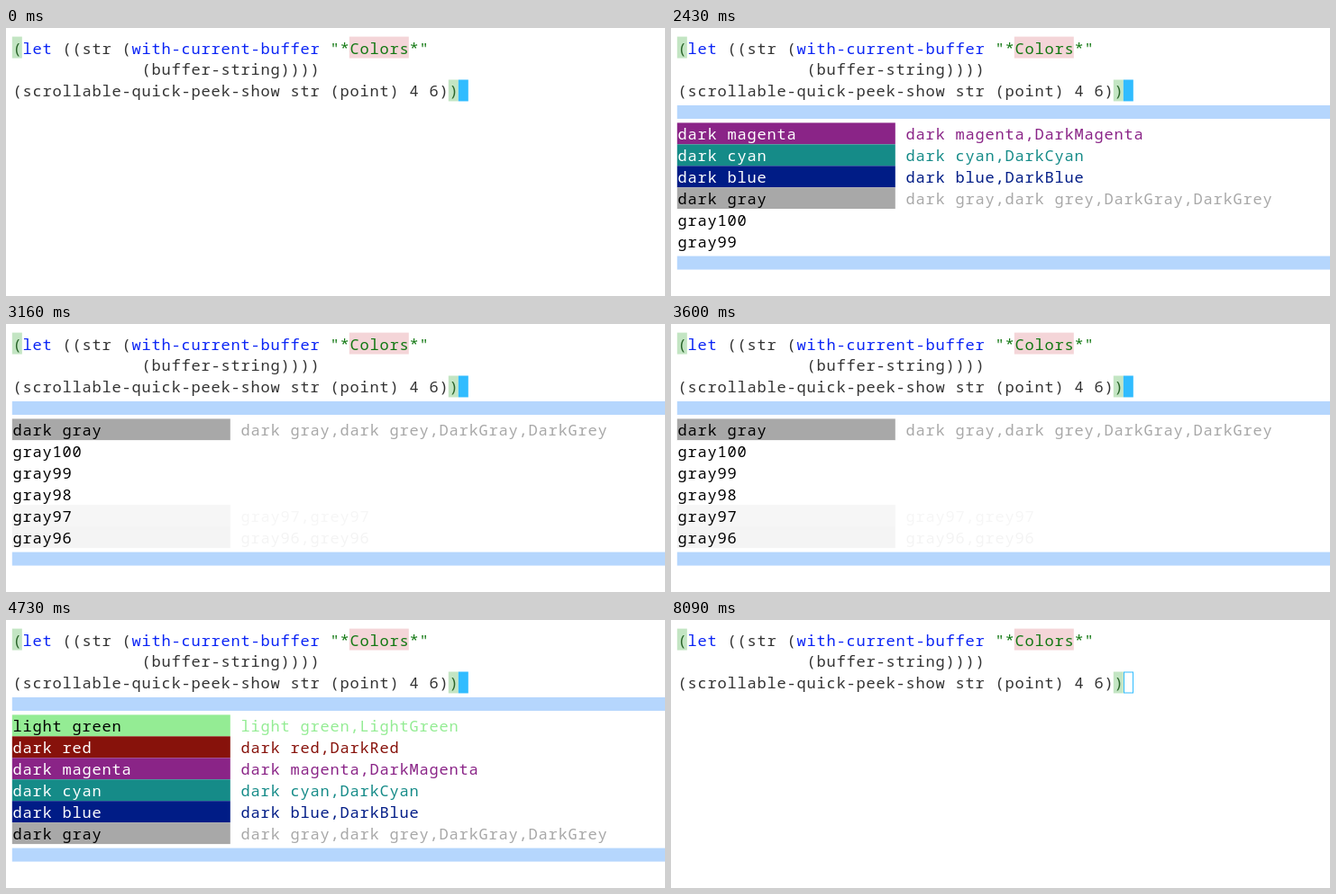
Write an HTML page that moves like this. It is 731 px wide and 298 px high and loops after 9.99 s.

```html
<!DOCTYPE html>
<html lang="en">
<head>
<meta charset="utf-8">
<title>Scrolling colour list</title>
<style>
  html, body { margin: 0; width: 100%; height: 100%; overflow: hidden; background: #fff; }
  svg { display: block; width: 731px; height: 298px; }
  text { font: 17px "Noto Sans Mono", "DejaVu Sans Mono", monospace; letter-spacing: .8px; white-space: pre; }
</style>
</head>
<body>
<svg viewBox="0 0 731 298"><g id="code"></g><g id="popup"></g></svg>
<script>
const LEFT = 6.8, TOP = 9.6, CHAR = 11, LINE = 23.95, LOOP = 9990;
const INK = '#333', KEYWORD = '#0a24f5', STRING = '#127812', PAREN = '#2a652a';
const MATCH = '#c3e5c3', BAR = '#b5d6fd', CURSOR = '#30bcff';

const rect = (x, y, w, h, fill, extra = '') =>
  `<rect x="${x}" y="${y}" width="${w}" height="${h}" fill="${fill}" ${extra}/>`;
const cells = (col, row, count, fill) =>
  rect(LEFT + col * CHAR, TOP + row * LINE, count * CHAR, LINE, fill);
const text = (col, row, str, fill, weight = 400) =>
  `<text x="${LEFT + col * CHAR + .6}" y="${TOP + row * LINE + 18.9}" fill="${fill}" font-weight="${weight}">${str}</text>`;
const bar = row => rect(LEFT, TOP + row * LINE + 4.5, 725, 15, BAR);

const colors = [
  ['light green', '#94ec94', '#000', 'light green,LightGreen'],
  ['dark red', '#87120b', '#fff', 'dark red,DarkRed'],
  ['dark magenta', '#8a2487', '#fff', 'dark magenta,DarkMagenta'],
  ['dark cyan', '#158b88', '#fff', 'dark cyan,DarkCyan'],
  ['dark blue', '#001c86', '#fff', 'dark blue,DarkBlue'],
  ['dark gray', '#a8a8a8', '#000', 'dark gray,dark grey,DarkGray,DarkGrey']
];
for (let n = 100; n >= 95; n--) {
  const level = n > 97 ? 255 : Math.round(n * 2.55 - 1);
  colors.push([`gray${n}`, `rgb(${level},${level},${level})`, '#000', `gray${n},grey${n}`]);
}

// [start in ms, first visible colour]; -1 hides the popup
const scroll = [[0, -1], [1000, 0], [2430, 2], [2710, 3], [2940, 4], [3160, 5], [3320, 6],
  [3600, 5], [3910, 4], [4210, 3], [4630, 2], [4730, 0], [5430, -1]];

const code = document.getElementById('code'), popup = document.getElementById('popup');
code.innerHTML =
  cells(0, 0, 1, MATCH) + cells(34, 0, 6, '#f4d5d8') + cells(44, 2, 1, MATCH) +
  '<g id="cursor"></g>' +
  text(0, 0, '(', PAREN) + text(1, 0, 'let', KEYWORD) + text(5, 0, '((str (', INK) +
  text(12, 0, 'with-current-buffer', KEYWORD) + text(32, 0, '"*Colors*"', STRING) +
  text(13, 1, '(buffer-string))))', INK) +
  text(0, 2, '(scrollable-quick-peek-show str (point) 4 6)', INK) + text(44, 2, ')', PAREN);
const cursor = document.getElementById('cursor');

function drawPopup(first) {
  if (first < 0) return '';
  return bar(3) + bar(10) + colors.slice(first, first + 6).map(([name, fill, ink, names], i) =>
    cells(0, i + 4, 22, fill) +
    text(0, i + 4, name, ink, ink === '#fff' ? 500 : 400) +
    text(23, i + 4, names, fill)).join('');
}

function drawCursor(solid) {
  return solid ? cells(45, 2, 1, CURSOR)
    : rect(502.5, 58, 10, 23, 'none', `stroke="${CURSOR}"`);
}

let shownFirst, shownSolid;
function frame() {
  const t = performance.now() % LOOP;
  const first = scroll.findLast(([start]) => start <= t)[1];
  const solid = t < 8090;
  if (first !== shownFirst) popup.innerHTML = drawPopup(shownFirst = first);
  if (solid !== shownSolid) cursor.innerHTML = drawCursor(shownSolid = solid);
  requestAnimationFrame(frame);
}
frame();
</script>
</body>
</html>
```
